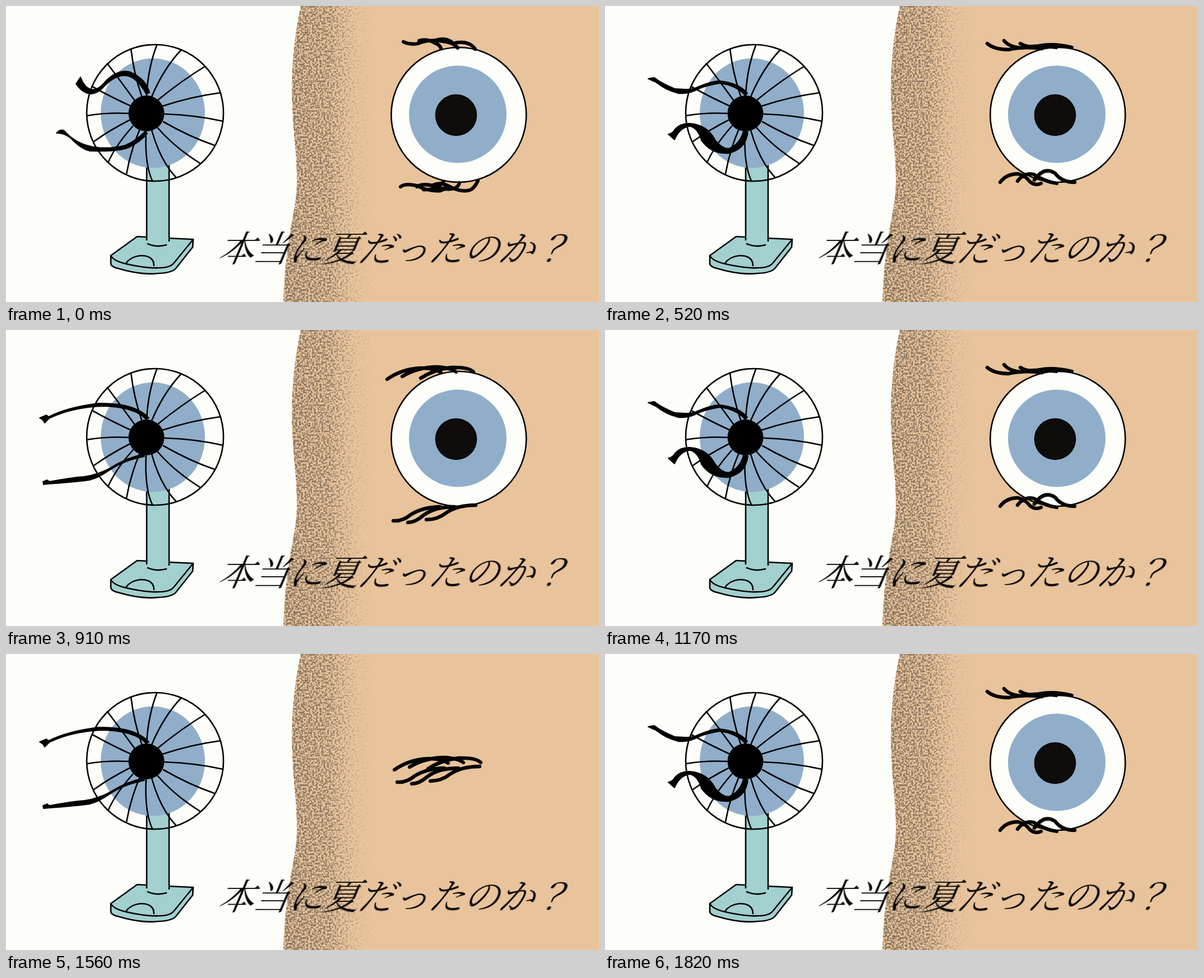
These frames come from a looping animation (1058 by 529 pixels, 1950 ms). An HTML page without scripts:

```html
<!DOCTYPE html>
<html lang="ja">
<head>
<meta charset="utf-8">
<title>本当に夏だったのか？</title>
<style>
html, body { margin: 0; width: 100%; height: 100%; overflow: hidden; background: #fdfef9; }
svg { display: block; width: 100vw; height: 100vh; }
text { font: 300 64px "Noto Serif CJK JP", "Noto Sans CJK JP", "Noto Sans CJK", serif; letter-spacing: -1.5px; fill: #0c0b0a; }
.line { fill: none; stroke: #000; stroke-width: 2.6; stroke-linecap: round; stroke-linejoin: round; }
.teal { fill: #a2d0cf; }
.iris { fill: #90aec9; }
.white { fill: #fdfef9; }
.ribbon { stroke: #000; stroke-width: 1.8; stroke-linejoin: round; }
.lash { fill: none; stroke: #060504; stroke-width: 6.3; stroke-linecap: round; stroke-linejoin: round; }

/* five wind poses, 130 ms each */
.pose { animation: pose 650ms step-end calc((var(--i) - 5) * 130ms) infinite; }
@keyframes pose { 0% { opacity: 1 } 20%, 100% { opacity: 0 } }

/* one blink at the end of every third gust */
.up, .low, .open, .half, .slit { animation: 1950ms step-end infinite; }
.up { animation-name: up; }
.low { animation-name: low; }
.open { animation-name: open; }
.half { animation-name: half; }
.slit { animation-name: slit; }
@keyframes up {
  0%, 93.333%, 100% { transform: none }
  66.667%, 86.667% { transform: translate(4px, 65px) }
  73.333% { transform: translate(8px, 87px) }
  80% { transform: translate(13px, 119px) }
}
@keyframes low {
  0%, 86.667%, 100% { transform: none }
  73.333% { transform: translate(5px, -90px) }
  80% { transform: translate(7px, -112px) }
}
@keyframes open { 0%, 93.333%, 100% { opacity: 1 } 66.667% { opacity: 0 } }
@keyframes half { 0%, 73.333%, 93.333%, 100% { opacity: 0 } 66.667%, 86.667% { opacity: 1 } }
@keyframes slit { 0%, 80%, 100% { opacity: 0 } 73.333% { opacity: 1 } }
</style>
</head>
<body>
<svg viewBox="0 0 1058 529" preserveAspectRatio="none">
  <defs>
    <linearGradient id="fade" gradientUnits="userSpaceOnUse" x1="495" x2="660">
      <stop offset="0" stop-color="#000"/>
      <stop offset=".5" stop-color="#000" stop-opacity=".86"/>
      <stop offset=".7" stop-color="#000" stop-opacity=".5"/>
      <stop offset=".85" stop-color="#000" stop-opacity=".2"/>
      <stop offset="1" stop-color="#000" stop-opacity="0"/>
    </linearGradient>
    <filter id="grain" filterUnits="userSpaceOnUse" x="490" y="0" width="175" height="529" color-interpolation-filters="sRGB">
      <feTurbulence type="fractalNoise" baseFrequency=".3" numOctaves="2" seed="7" result="noise"/>
      <feComposite in="noise" in2="SourceGraphic" operator="arithmetic" k2="6" k3="1.2" k4="-3.65" result="dots"/>
      <feFlood flood-color="#86735d"/>
      <feComposite in2="dots" operator="in"/>
      <feComposite in2="SourceGraphic" operator="in"/>
    </filter>
    <path id="skin" d="M526 0C516 45 510 95 510 150C510 215 519 260 519 312C519 350 509 385 505 415C499 455 496 490 495 529H1058V0Z"/>
    <circle id="rim" cx="807.800" cy="194.500" r="120.500"/>
    <path id="halfLid" d="M692 160Q808 120 924 160A120.5 120.5 0 1 1 692 160Z"/>
    <path id="slitLid" d="M684 190Q808 130 934 190Q808 260 684 190Z"/>
    <clipPath id="halfClip"><use href="#halfLid"/></clipPath>
    <clipPath id="slitClip"><use href="#slitLid"/></clipPath>
    <g id="ball">
      <use class="white" href="#rim"/>
      <circle class="iris" cx="806" cy="193.500" r="87"/>
      <circle cx="803" cy="195" r="36.500" fill="#0e0d0b" stroke="#000" stroke-width="1.500"/>
    </g>
  </defs>

  <rect class="white" width="1058" height="529"/>
  <use href="#skin" fill="#e8c39b"/>
  <use href="#skin" fill="url(#fade)" filter="url(#grain)"/>

  <!-- fan stand -->
  <path class="teal" d="M234 412L334 417V430L303 469Q296 477 270 478Q240 481 200 469Q187 466 187 460V446Z"/>
  <path class="line" d="M251 413L234 412L187 446V460Q187 466 200 469Q240 481 270 478Q296 477 303 469L333 431L334 417L291 415M187 446Q192 456 215 461Q250 469 272 468Q292 468 299 460L334 417M214 460Q222 448 240 446Q264 446 264 464"/>
  <path class="teal" d="M251 284H291V424Q270 432 251 425Z"/>
  <path class="line" d="M251 288V418M291 284V420M253 425Q268 432 286 427"/>

  <!-- fan head -->
  <ellipse class="iris" cx="262" cy="191.500" rx="93" ry="98"/>
  <circle class="line" cx="266" cy="191" r="122"/>
  <path class="line" d="M269 70Q253 112 251 160M312 79Q281 112 260 162M355 108Q314 133 271 168M383 155Q330 162 279 179M387 206Q340 195 282 193M372 249Q328 234 281 207M346 281Q300 252 270 217M303 306Q275 276 260 222M261 312Q247 282 250 224M215 300Q222 260 238 222M182 280Q195 250 226 215M157 242Q185 222 220 204M145 196Q180 190 219 192M154 144Q190 164 221 178M181 103Q205 135 229 168M223 77Q228 120 242 161"/>

  <!-- ribbons -->
  <g class="ribbon">
    <path class="pose" style="--i:0" d="M133 127L125 139Q137 157 152 157Q165 156 176 143Q192 126 210 124Q232 124 250 157L256 155Q250 130 222 118Q200 112 178 134Q163 152 152 149Q140 146 133 127Z
      M90 227Q97 219 104 223Q122 243 145 249Q175 258 212 249Q232 241 248 224L252 228Q240 243 217 254Q195 261 150 259Q135 257 115 236Q105 227 90 227Z"/>
    <path class="pose" style="--i:1" d="M86 160L97 171Q110 168 130 148Q165 126 200 128Q235 132 250 158L254 155Q238 125 200 121Q160 120 125 141Q105 162 86 160Z
      M72 250Q80 246 88 250Q120 262 150 258Q195 250 247 223L250 227Q205 255 152 265Q115 269 72 250Z"/>
    <path class="pose" style="--i:2" d="M60 157L72 152L76 155Q110 138 165 131Q230 130 255 157L250 160Q230 137 170 136Q115 139 77 158L69 166L66 161Z
      M66 271L73 268L78 271Q115 264 140 262Q165 258 185 247Q215 228 246 222L247 226Q210 233 184 251Q165 264 150 268Q120 272 76 275L67 276Z"/>
    <path class="pose" style="--i:3" d="M47 139L57 135Q110 148 165 134Q230 128 254 156L250 160Q228 135 168 139Q110 156 60 145L53 149Z
      M80 262L92 268Q110 244 135 240Q160 244 185 253Q225 252 251 225L247 223Q220 245 188 246Q160 236 135 234Q105 238 92 258Z"/>
    <path class="pose" style="--i:4" d="M77 130L88 128Q100 138 125 148Q150 150 160 147Q190 134 205 134Q240 138 254 156L250 160Q235 142 205 138Q180 142 165 149Q150 158 130 156Q108 150 92 137Z
      M113 229L124 239Q134 216 152 215Q166 219 172 240Q190 266 222 263Q252 255 255 225L247 224Q240 248 220 255Q208 254 197 240Q182 212 152 210Q135 209 125 220Q121 228 113 229Z"/>
  </g>
  <circle cx="250.500" cy="192" r="32"/>

  <!-- eye -->
  <g class="open">
    <use href="#ball"/>
    <use class="line" href="#rim"/>
  </g>
  <g class="half">
    <use href="#ball" clip-path="url(#halfClip)"/>
    <use class="line" href="#halfLid"/>
  </g>
  <g class="slit">
    <use href="#ball" clip-path="url(#slitClip)"/>
    <use class="line" href="#slitLid"/>
  </g>

  <g class="lash up">
    <path class="pose" style="--i:0" d="M709 64Q722 70 735 67Q755 59 778 63Q800 66 806 75M737 62Q752 58 765 66Q775 70 776 76M767 61Q790 54 803 73M797 67Q825 60 837 77"/>
    <path class="pose" style="--i:1" d="M692 80Q710 76 728 68Q755 60 776 75M720 76Q738 66 760 62Q785 62 804 75M753 76Q775 56 800 62Q825 66 836 76"/>
    <path class="pose" style="--i:2" d="M680 88Q705 70 740 68Q765 68 776 76M707 83Q735 66 770 66Q795 68 803 75M740 86Q765 70 795 67Q825 66 834 75"/>
    <path class="pose" style="--i:3" d="M676 77Q705 76 735 70Q760 68 778 76M706 74Q738 72 765 67Q790 68 804 75M738 77Q765 74 795 67Q822 68 834 75"/>
    <path class="pose" style="--i:4" d="M682 67Q695 78 720 78Q745 72 780 76M712 62Q722 74 745 75Q770 69 805 74M741 67Q755 76 775 71Q800 66 833 74"/>
  </g>
  <g class="lash low">
    <path class="pose" style="--i:0" d="M704 323Q714 316 735 322Q755 332 775 330Q790 326 780 316M733 323Q745 316 765 322Q785 330 800 326Q808 322 809 316M762 320Q775 314 790 322Q815 335 830 328Q838 322 842 312M745 328Q768 330 780 314"/>
    <path class="pose" style="--i:1" d="M694 331Q710 330 728 326Q755 326 776 316M722 335Q742 330 760 326Q785 326 804 316M753 334Q775 330 795 326Q825 324 840 313"/>
    <path class="pose" style="--i:2" d="M691 341Q708 342 722 330Q745 316 775 316M717 344Q730 344 745 331Q765 316 800 316M750 339Q770 339 785 327Q805 313 838 313"/>
    <path class="pose" style="--i:3" d="M698 328Q710 314 732 315Q755 322 778 316M724 329Q740 313 762 314Q785 321 804 317M757 327Q775 309 797 311Q815 318 838 314"/>
    <path class="pose" style="--i:4" d="M705 315Q716 300 737 300Q750 303 758 314Q768 322 778 317M736 313Q748 297 765 301Q785 314 806 317M766 311Q783 286 803 299Q815 315 838 315"/>
  </g>

  <text transform="translate(376 457) skewX(-23)">本当に夏だったのか？</text>
</svg>
</body>
</html>
```
